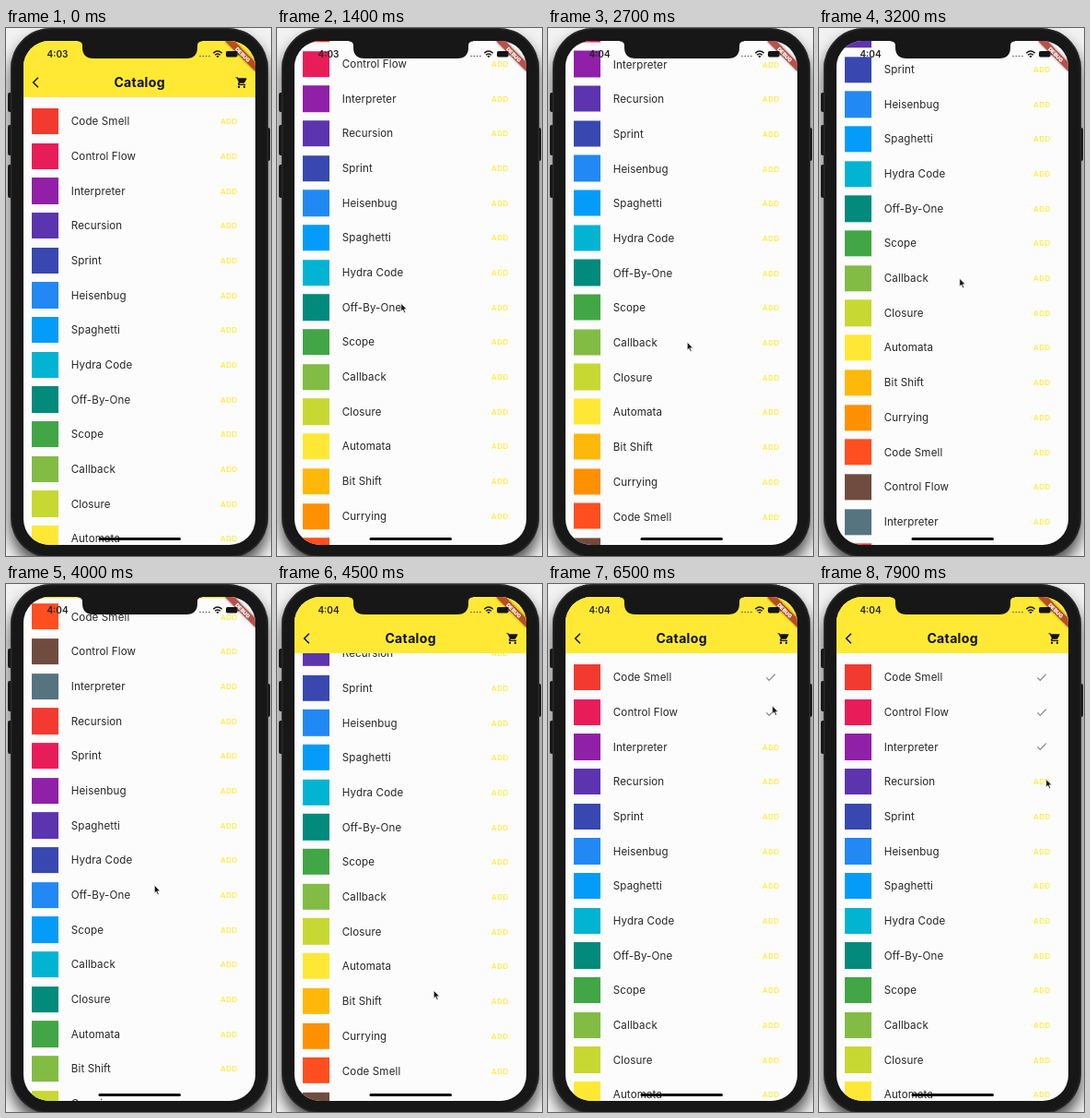
These frames come from a looping animation (288 by 572 pixels, 8000 ms). An HTML page:

```html
<!DOCTYPE html>
<html lang="en">
<head>
<meta charset="utf-8">
<title>Catalog</title>
<style>
html, body { margin: 0; width: 100%; height: 100%; overflow: hidden; }
body { background: #f2f2f2; font-family: Inter, Roboto, sans-serif; color: #262626; }
#stage { position: absolute; left: 0; top: 0; width: 288px; height: 572px; overflow: hidden; }
#stage * { box-sizing: border-box; }
.button { position: absolute; left: 2px; width: 5px; background: #222; border-radius: 2px; }
#body {
  position: absolute; left: 5px; top: 0; width: 280px; height: 574px;
  border-radius: 44px; background: #171717;
  box-shadow: inset 0 0 2px 1px #333, 0 10px 16px rgba(0, 0, 0, .7);
}
#screen {
  position: absolute; left: 19px; top: 14.4px; width: 252.3px; height: 546px;
  border-radius: 28px; overflow: hidden; background: #fcfcfc;
}
#list { position: absolute; left: 0; top: 67.8px; width: 100%; }
.row { position: relative; height: 37.7px; line-height: 38.7px; font-size: 11.6px; letter-spacing: .1px; white-space: nowrap; }
.swatch { position: absolute; left: 9.4px; top: 4.7px; width: 28.3px; height: 28.3px; }
.name { position: absolute; left: 51.8px; }
.add { position: absolute; left: 203.5px; width: 40px; text-align: center; font-size: 8px; font-weight: 500; letter-spacing: .55px; color: #ffe935; }
.tick { position: absolute; left: 216.3px; top: 11.8px; width: 14.1px; height: 14.1px; fill: #858585; visibility: hidden; }
.added .add { visibility: hidden; }
.added .tick { visibility: visible; }
#bar { position: absolute; left: 0; top: 0; width: 100%; height: 60.7px; background: #ffe935; color: #111; }
#bar h1 { position: absolute; left: 0; top: 28px; width: 100%; margin: 0; line-height: 33px; text-align: center; font-size: 14.1px; font-weight: 700; letter-spacing: .3px; }
#bar svg { position: absolute; top: 37.3px; width: 14.1px; height: 14.1px; fill: #111; }
#banner {
  position: absolute; left: 214.6px; top: 10.4px; width: 47px; height: 7.2px; line-height: 7.2px;
  transform: rotate(45deg); background: rgba(165, 34, 26, .78); box-shadow: 0 0 3px rgba(0, 0, 0, .5);
  color: #fff; font-size: 5.8px; font-weight: 900; text-align: center;
}
#clock { position: absolute; left: 36px; top: 22px; width: 40px; line-height: 13px; text-align: center; font-size: 10px; font-weight: 600; color: #222; }
#over { position: absolute; left: 0; top: 0; }
#cursor { position: absolute; left: 0; top: 0; width: 9px; height: 13px; overflow: visible; }
</style>
</head>
<body>
<div id="stage">
  <i class="button" style="top:70px;height:21px"></i>
  <i class="button" style="top:105px;height:33px"></i>
  <i class="button" style="top:148px;height:36px"></i>
  <i class="button" style="left:282px;top:108px;height:36px"></i>
  <div id="body"></div>
  <div id="screen">
    <div id="list"></div>
    <div id="bar">
      <svg style="left:6px" viewBox="0 0 24 24"><path d="M17.8 3.9 16 2.1 6.1 12l9.9 9.9 1.8-1.8L9.7 12z"/></svg>
      <h1>Catalog</h1>
      <svg style="left:230.4px" viewBox="0 0 24 24"><circle cx="7" cy="20" r="2"/><circle cx="17" cy="20" r="2"/><path d="M1 2v2h2l3.6 7.6-1.4 2.4C4.5 15.4 5.4 17 7 17h12v-2H7.4l1.1-2H16c.7 0 1.4-.4 1.7-1l3.6-6.5A1 1 0 0 0 20.4 4H5.2l-.9-2z"/></svg>
    </div>
    <div id="banner">DEBUG</div>
  </div>
  <div id="clock">4:03</div>
  <svg id="over" width="288" height="572">
    <path fill="#171717" d="M78 13.5H213V14.4Q208 14.4 208 19V21Q208 33 196 33H95Q83 33 83 21V19Q83 14.4 78 14.4Z"/>
    <path d="M211 30.5H222" stroke="#555" stroke-width="1.6" stroke-linecap="round" stroke-dasharray="0 3.3"/>
    <path d="M225.300 27.200Q230 22.800 234.700 27.200M227.100 29.300Q230 26.600 232.900 29.300" fill="none" stroke="#151515" stroke-width="1.5"/>
    <path fill="#151515" d="M228.400 30.500Q230 29.200 231.600 30.500L230 32.200Z"/>
    <rect x="239" y="25" width="12.6" height="6.6" rx="1.8" fill="#151515"/>
    <rect x="252" y="27" width="1" height="2.6" rx=".5" fill="#444"/>
    <rect x="100.5" y="552" width="89.5" height="3" rx="1.5" fill="#080808"/>
  </svg>
  <svg id="cursor" viewBox="0 0 9 13"><path d="M.3.3V9L2.3 7.2 3.7 10.5 5.2 9.9 3.8 6.7H6.6Z" fill="#111" stroke="#fff" stroke-width=".7"/></svg>
</div>
<script>
const names = ['Code Smell', 'Control Flow', 'Interpreter', 'Recursion', 'Sprint', 'Heisenbug', 'Spaghetti',
  'Hydra Code', 'Off-By-One', 'Scope', 'Callback', 'Closure', 'Automata', 'Bit Shift', 'Currying'];
const colors = ['#f23a30', '#e91c5a', '#9020a8', '#5c34b0', '#3848b0', '#2288f4', '#049cf8', '#02b4d2', '#028a7c',
  '#42a646', '#82bc44', '#c8d832', '#ffe835', '#ffb80a', '#ff9002', '#ff4e20', '#704c40', '#567380'];

const LOOP = 8000, STEP = 100, ROWS = 32, BAR = 60.7;
const FIRST_STOP = 137.5, PEAK = 632, RETURN_AT = 3930;
const taps = [0, 1, 2].map(i => 5500 + 850 * i);

// Pointer stops while dragging the list: time, x, y.
const stops = [[900, 135, 398], [1400, 134.5, 298], [2200, 148.5, 205.5], [2700, 151, 340],
  [3200, 152.5, 271], [4000, 161, 326], [4500, 170, 440], [5100, 242, 92]];

const easeOut = u => 1 - (1 - u) ** 2;
const easeInOut = power => u => u < .5 ? (2 * u) ** power / 2 : 1 - (2 - 2 * u) ** power / 2;
const glide = (t, start, length, ease) => ease(Math.min(1, Math.max(0, (t - start) / length)));

const scrollAt = t =>
  FIRST_STOP * glide(t, 900, 1050, easeOut)
  + (PEAK - FIRST_STOP) * glide(t, 2800, 1100, easeInOut(4))
  - PEAK * glide(t, RETURN_AT, 920, easeInOut(3));

function pointerAt(t) {
  let [lastTime, x, y] = stops[0];
  for (const [time, nextX, nextY] of stops.slice(1)) {
    const u = glide(t, lastTime, time - lastTime, easeInOut(1));
    x += (nextX - x) * u;
    y += (nextY - y) * u;
    lastTime = time;
  }
  // After each tap the pointer goes one row down.
  const rows = taps.reduce((sum, tap) => sum + glide(t, tap + 200, 500, easeInOut(2)), 0);
  return [x + 1.5 * rows, y + 39.7 * rows];
}

const $ = id => document.getElementById(id);
const list = $('list'), bar = $('bar'), clock = $('clock'), cursor = $('cursor');

for (let i = 0; i < ROWS; i++) {
  list.insertAdjacentHTML('beforeend', `<div class="row">
    <i class="swatch" style="background:${colors[i % colors.length]}"></i>
    <span class="name">${names[i % names.length]}</span><span class="add">ADD</span>
    <svg class="tick" viewBox="0 0 24 24"><path d="M9 16.17 4.83 12l-1.42 1.41L9 19 21 7l-1.41-1.41z"/></svg></div>`);
}

const move = (el, x, y) => { el.style.transform = `translate(${x}px, ${y}px)`; };

function draw(t) {
  const scroll = scrollAt(t);
  // The bar leaves with the list and floats back in once scrolling reverses.
  const shown = Math.max(0, BAR - scroll, t > RETURN_AT ? PEAK - scroll : 0);
  move(list, 0, -scroll);
  move(bar, 0, Math.min(BAR, shown) - BAR);
  move(cursor, ...pointerAt(t));
  cursor.style.visibility = t < stops[0][0] ? 'hidden' : 'visible';
  clock.textContent = t < 2700 ? '4:03' : '4:04';
  taps.forEach((tap, i) => list.children[i].classList.toggle('added', t >= tap));
}

const start = performance.now();
function tick() {
  const t = (performance.now() - start) % LOOP;
  draw(Math.floor(t / STEP) * STEP);
  requestAnimationFrame(tick);
}
tick();
</script>
</body>
</html>
```
